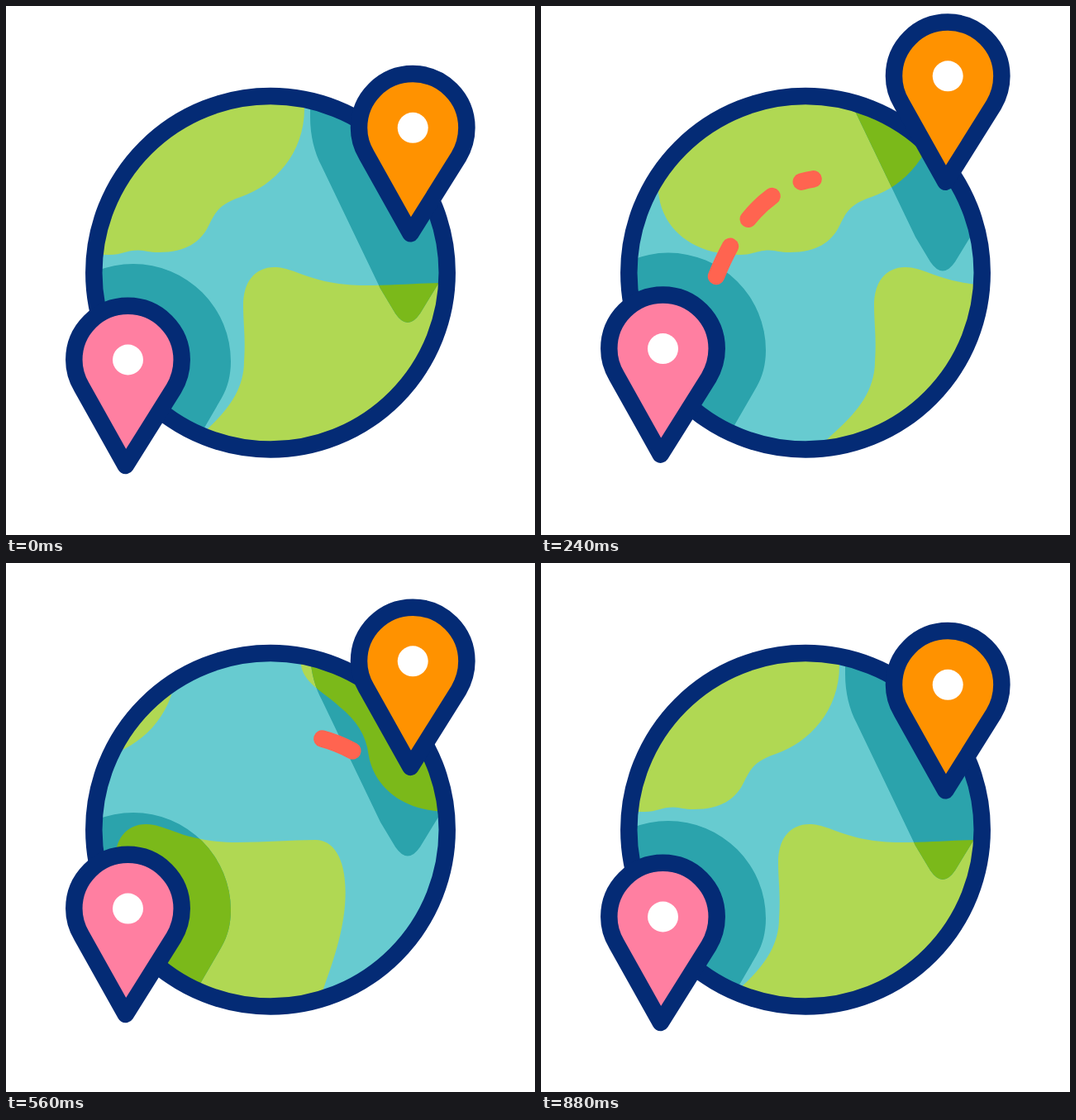
Recreate the animation shown at these times as an HTML page. Size 640 by 640 pixels, loop 920 ms.

```html
<!DOCTYPE html>
<html lang="en">
<head>
<meta charset="utf-8">
<title>Globe route</title>
<style>
  html, body { margin: 0; width: 100%; height: 100%; overflow: hidden; background: #fff; }
  svg { display: block; width: 100%; height: 100%; }
  .pin path { stroke: #042b75; stroke-width: 20.5; stroke-linejoin: round; }
  .pin circle { fill: #fff; }
  #route { fill: none; stroke: #ff6450; stroke-width: 20.5; stroke-linecap: round; }
</style>
</head>
<body>
<svg viewBox="0 0 640 640">
  <defs>
    <g id="continents">
      <path d="M-58 95L-55 122C-52 145-30 154-8 174C12 190 24 208 27 232C32 265 62 301 125 301C140 301 146 295.5 160 295.5C170 296 172 298 185 298C218 298 235 285 244 268C253 250 257 240 284 231C325 217 361 178 361 124V95Z"/>
      <path d="M220 535C235 515 288 485 288 430C290 400 287 385 287 362C287 335 300 316 325 316C350 316 370 338 435 338C470 338 500 335 530 335C550 335 566 355 566 398C566 440 553 480 528 545Z"/>
    </g>
    <g id="land">
      <use class="scroll" href="#continents"/>
      <use class="scroll" href="#continents"/>
    </g>
    <g id="pin" class="pin">
      <path d="M-2.8 128L-56 33C-62 23-65.2 12-65.2 0A65.2 65.2 0 0 1 65.2 0C65.2 12 62 24 55.5 35Z"/>
      <circle r="18.5"/>
    </g>
    <clipPath id="sphere"><circle cx="320" cy="322.8" r="208"/></clipPath>
    <clipPath id="shade">
      <path class="a" d="M36 430A118 118 0 0 1 272 430C272 447 268 462 261 474L180 614H36Z"/>
      <path class="b" d="M368 40V134C368 157 373 177 382 194L453 342L471 372Q486 394 501 372L523 336L600 212V40Z"/>
    </clipPath>
  </defs>

  <g clip-path="url(#sphere)">
    <rect width="640" height="640" fill="#67cbd0"/>
    <use href="#land" fill="#b0d853"/>
    <g clip-path="url(#shade)">
      <rect width="640" height="640" fill="#2ba3ac"/>
      <use href="#land" fill="#7bb91a"/>
    </g>
  </g>
  <circle cx="320" cy="322.8" r="213.7" fill="none" stroke="#042b75" stroke-width="20.5"/>
  <g class="b"><use href="#pin" x="492.2" y="147.3" fill="#ff9200"/></g>
  <g class="a"><use href="#pin" x="147.5" y="428" fill="#ff7fa1"/></g>
  <path id="route" d="M212 327C232 278 270 208 348 208C385 208 418 224 446 244"/>
</svg>

<script>
  const STEP = 40, STEPS = 23;   // 25 pictures a second, 920 ms
  const LAP = 567;               // width of one turn of the map
  const DASH = 40, GAP = 39.6;

  const all = s => [...document.querySelectorAll(s)];
  const pinA = all('.a'), pinB = all('.b'), maps = all('.scroll');
  const route = document.getElementById('route');
  const length = route.getTotalLength();

  // Eased progress from time a to time b
  const ease = (t, a, b) => {
    const u = Math.min(1, Math.max(0, (t - a) / (b - a)));
    return u * u * (3 - 2 * u);
  };

  // Three bounces: [time, height]
  const hops = [[.5, 0], [3.5, 67.5], [7, 0], [10, 38.4], [13, 0], [16, 38.4], [19, 0]];
  const hop = t => hops.slice(1).reduce(
    (y, [b, h], i) => y + (h - hops[i][1]) * ease(t, hops[i][0], b), 0);

  // Map travel: [time, distance, speed], joined by Hermite curves
  const travel = [[0, 0, 0], [4, 56, 24.7], [6, 116, 32.1], [9, 222, 36],
                  [12, 332, 36.9], [17, 515, 23.6], [22, LAP, 0]];
  const spin = t => {
    const i = Math.max(1, travel.findIndex(k => t <= k[0]));
    const [t0, x0, v0] = travel[i - 1], [t1, x1, v1] = travel[i];
    const d = t1 - t0, u = (t - t0) / d, w = 1 - u;
    return x0 + (x1 - x0) * u * u * (3 - 2 * u) + d * u * w * (v0 * w - v1 * u);
  };

  const move = (els, x, y) =>
    els.forEach(el => el.setAttribute('transform', `translate(${x} ${y})`));

  // Dashes start at the trimmed beginning of the path
  function drawRoute(t) {
    const from = length * ease(t, 6.5, 17.5), to = length * ease(t, 1, 10);
    const dashes = [];
    for (let s = from; s < to; s += DASH + GAP) dashes.push(Math.min(DASH, to - s), GAP);
    route.style.display = dashes.length ? '' : 'none';
    if (!dashes.length) return;
    dashes[dashes.length - 1] = 2000;
    route.setAttribute('stroke-dasharray', dashes.join(' '));
    route.setAttribute('stroke-dashoffset', -from);
  }

  function draw(now) {
    const t = Math.floor(now / STEP) % STEPS;
    const x = spin(t);
    move(pinA, 0, -hop(t));
    move(pinB, 0, -hop(t - 3));
    move([maps[0]], x, 0);
    move([maps[1]], x - LAP, 0);
    drawRoute(t);
  }

  const start = performance.now();
  (function loop() {
    draw(performance.now() - start);
    requestAnimationFrame(loop);
  })();
</script>
</body>
</html>
```
